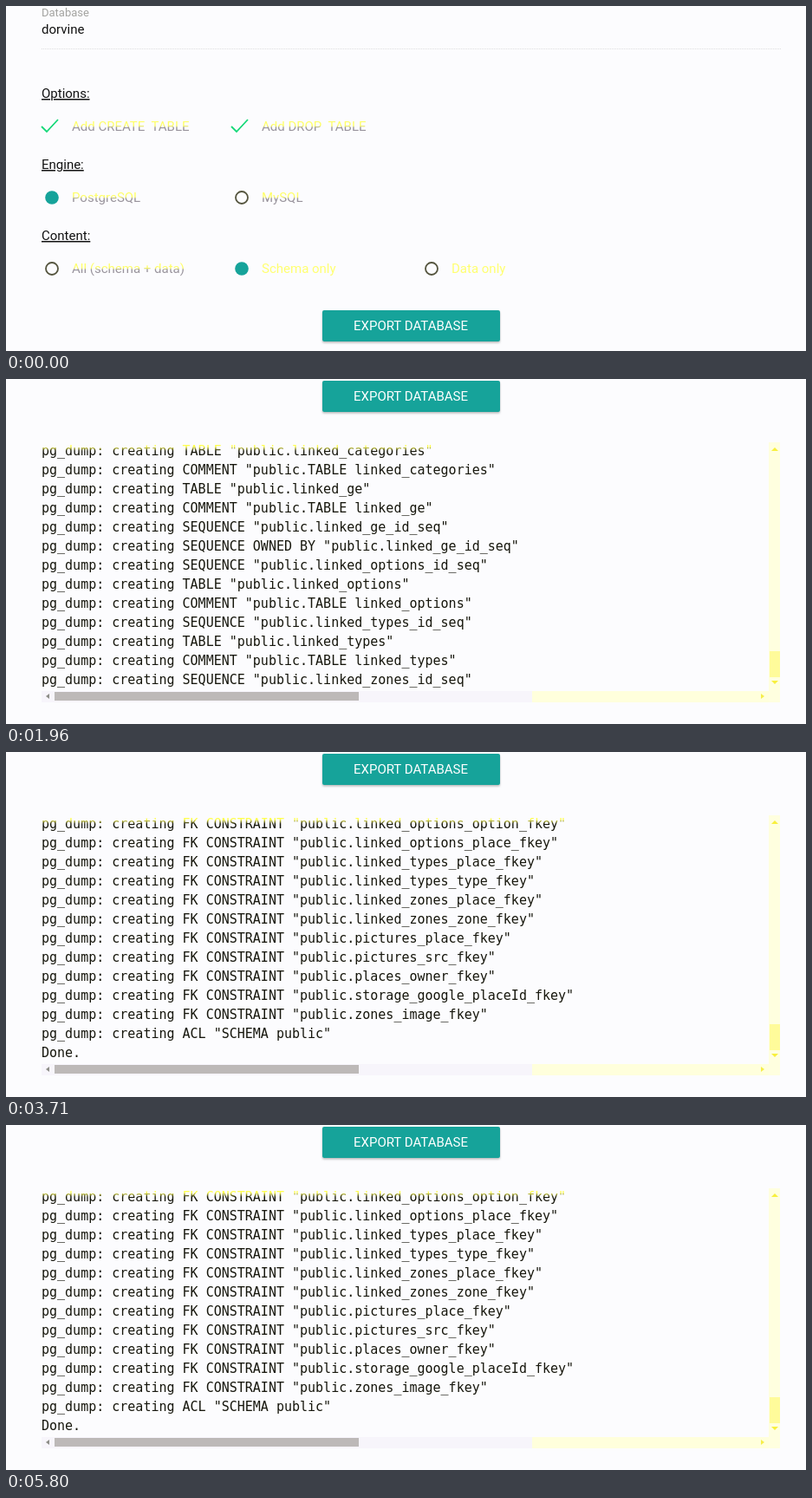
Write an HTML page that moves like this. It is 923x398 px and loops after 5.84 s.

```html
<!DOCTYPE html>
<html lang="en">
<head>
<meta charset="utf-8">
<title>Database export</title>
<style>
  html, body { margin: 0; width: 100%; height: 100%; overflow: hidden; background: #fcfcfe; }
  svg { display: block; width: 923px; height: 398px; }
  text { white-space: pre; font: 15px Roboto, sans-serif; fill: #111; }
  .small { font-size: 13px; fill: #a3a3a0; }
  .head { text-decoration: underline; }
  .label { fill: url(#faded); }
  .pale { fill: #ffff70; }
  .log { font: 15px "DejaVu Sans Mono", monospace; fill: #16160c; }
  .log.first { fill: url(#edge); }
  .cta { fill: #fff; }
</style>
</head>
<body>
<svg viewBox="0 0 923 398">
  <defs>
    <linearGradient id="faded" x1="0" y1="0" x2="0" y2="1">
      <stop offset=".45" stop-color="#ffff68"/>
      <stop offset=".58" stop-color="#98939c"/>
    </linearGradient>
    <linearGradient id="edge" gradientUnits="userSpaceOnUse" x1="0" y1="427" x2="0" y2="432">
      <stop offset="0" stop-color="#ffff50"/>
      <stop offset="1" stop-color="#16160c"/>
    </linearGradient>
    <filter id="shadow" x="-5%" y="-20%" width="110%" height="150%">
      <feDropShadow dx="0" dy="1.5" stdDeviation="1" flood-color="#000" flood-opacity=".28"/>
    </filter>
    <clipPath id="view"><rect x="41" y="422" width="839" height="287"/></clipPath>
  </defs>
  <g id="page">
    <g id="form"></g>
    <rect x="365" y="351" width="205" height="36" rx="2" fill="#16a39a" filter="url(#shadow)"/>
    <text class="cta" x="401" y="374">EXPORT DATABASE</text>
    <g id="console">
      <g id="log" clip-path="url(#view)"></g>
      <rect x="41" y="709" width="566" height="13" fill="#f7f5fb"/>
      <rect x="607" y="709" width="273" height="13" fill="#ffffdc"/>
      <rect x="56" y="710" width="351" height="10" fill="#bdb9b8"/>
      <path d="M50 712v6l-4-3z" fill="#8d8d88"/>
      <path d="M871 712v6l4-3z" fill="#f6ee4a"/>
      <rect x="880" y="422" width="13" height="300" fill="#ffffdf"/>
      <rect x="881" y="663" width="12" height="30" fill="#fffb9a"/>
      <path d="M883 432h8l-4-4z M883 697h8l-4 4z" fill="#f8f03c"/>
    </g>
  </g>
</svg>
<script>
const LOOP = 5840, ROW = 22, FIRST_ROW = 437;
const $ = id => document.getElementById(id);

function add(parent, tag, attrs, text = "") {
  const el = document.createElementNS("http://www.w3.org/2000/svg", tag);
  for (const key in attrs) el.setAttribute(key, attrs[key]);
  el.textContent = text;
  parent.append(el);
  return el;
}

const form = $("form");
const write = (x, y, text, cls = "") => add(form, "text", { x, y, class: cls }, text);

function check(x, y, text) {
  add(form, "path", { d: `M${x} ${y}l6 6L${x + 19} ${y - 8}`, fill: "none", stroke: "#14d878", "stroke-width": 1.8 });
  write(x + 35, y + 5, text, "label");
}

function radio(x, y, text, on, cls = "label") {
  add(form, "circle", on
    ? { cx: x, cy: y, r: 7.8, fill: "#16a39a" }
    : { cx: x, cy: y, r: 7, fill: "none", stroke: "#55553f", "stroke-width": 1.8 });
  write(x + 23, y + 5, text, cls);
}

write(41, 12, "Database", "small");
write(41, 32, "dorvine");
add(form, "path", { d: "M41 49.5H894", stroke: "#dededf", "stroke-dasharray": "1 1" });
write(41, 106, "Options:", "head");
check(41, 139, "Add CREATE  TABLE");
check(260, 139, "Add DROP  TABLE");
write(41, 188, "Engine:", "head");
radio(53, 221, "PostgreSQL", true);
radio(272, 221, "MySQL", false);
write(41, 270, "Content:", "head");
radio(53, 303, "All (schema + data)", false);
radio(272, 303, "Schema only", true, "pale");
radio(491, 303, "Data only", false, "pale");

const security = name => `reading row security enabled for table "public.${name}"`;
const policies = name => `reading policies for table "public.${name}"`;
const prefix = line => "pg_dump: " + line;

const reading = ["favorites", "linked_categories_id_seq", "linked_categories",
  "linked_options_id_seq", "linked_options", "linked_types_id_seq", "linked_types"]
  .flatMap(name => [security(name), policies(name)]).slice(0, 13).map(prefix);

const table = name => [`TABLE "public.${name}"`, `COMMENT "public.TABLE ${name}"`];
const sequence = name => `SEQUENCE "public.${name}_id_seq"`;
const creating = [
  ...table("linked_categories"),
  ...table("linked_ge"),
  sequence("linked_ge"),
  'SEQUENCE OWNED BY "public.linked_ge_id_seq"',
  sequence("linked_options"),
  ...table("linked_options"),
  sequence("linked_types"),
  ...table("linked_types"),
  sequence("linked_zones")
].map(item => prefix("creating " + item));

const finished = ["linked_options_option", "linked_options_place", "linked_types_place",
  "linked_types_type", "linked_zones_place", "linked_zones_zone", "pictures_place",
  "pictures_src", "places_owner", "storage_google_placeId", "zones_image"]
  .map(key => prefix(`creating FK CONSTRAINT "public.${key}_fkey"`))
  .concat(prefix('creating ACL "SCHEMA public"'), "Done.");

const rows = reading.map((line, i) =>
  add($("log"), "text", { x: 41, y: FIRST_ROW + i * ROW, class: i ? "log" : "log first" }));

let shown;
function showLog(lines) {
  if (lines === shown) return;
  shown = lines;
  rows.forEach((row, i) => row.textContent = lines[i]);
}

const easeInOut = p => p < .5 ? 4 * p ** 3 : 1 - (2 - 2 * p) ** 3 / 2;

function scrollAt(t) {
  if (t >= 1200) return 349;
  const p = Math.min(1, Math.max(0, (t - 40) / 560));
  return Math.round(348 * easeInOut(p));
}

function draw(t) {
  $("page").setAttribute("transform", `translate(0 ${-scrollAt(t)})`);
  $("console").setAttribute("visibility", t < 40 ? "hidden" : "visible");
  showLog(t < 1500 ? reading : t < 2630 ? creating : finished);
}

const start = performance.now();
function tick() {
  draw((performance.now() - start) % LOOP);
  requestAnimationFrame(tick);
}
tick();
</script>
</body>
</html>
```
